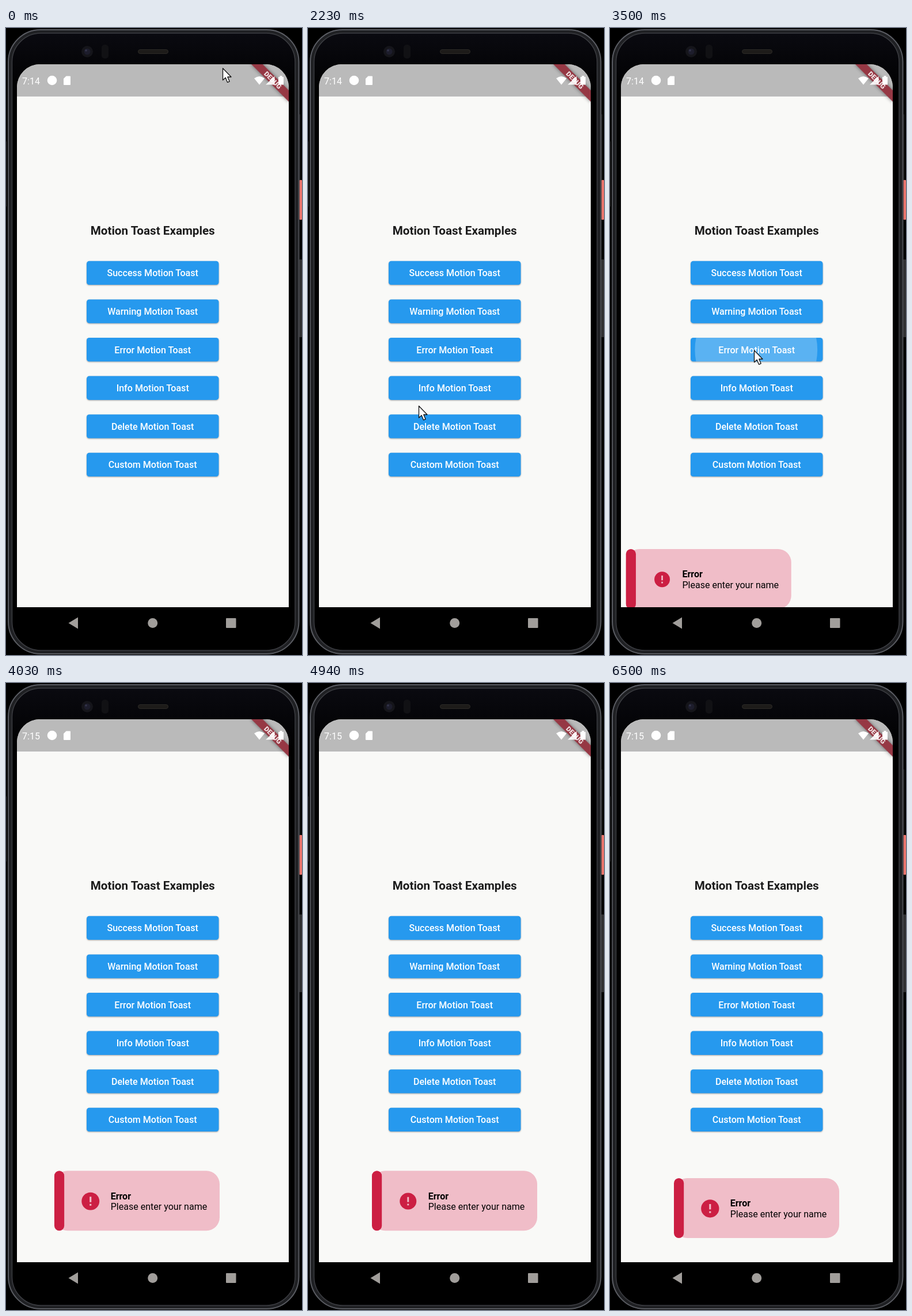
An HTML page for the animation above (6.53 s loop, 514 px wide and 1089 px high).

```html
<!DOCTYPE html>
<html lang="en">
<head>
<meta charset="utf-8">
<title>Motion Toast Examples</title>
<style>
  html, body { margin: 0; width: 100%; height: 100%; overflow: hidden; background: #000; }
  svg { display: block; width: 514px; height: 1089px; font: 16.06px Roboto, sans-serif; }
  .title { font-size: 20.65px; font-weight: 700; fill: #1c1c1c; }
  .label { font-weight: 500; fill: #fff; }
  .button { fill: #2699ee; filter: drop-shadow(0 1.6px 1.2px #0005); }
  .mid { text-anchor: middle; }
  .bold { font-weight: 700; }
</style>
</head>
<body>
<svg viewBox="0 0 514 1089">
  <defs>
    <clipPath id="screen"><path d="M19 1006V103a40 40 0 0 1 40-40H451a40 40 0 0 1 40 40V1006Z"/></clipPath>
    <clipPath id="errorButton"><rect x="140" y="538" width="229.500" height="41.300" rx="4.600"/></clipPath>
    <linearGradient id="edge" x2="0" y2="1">
      <stop offset="0" stop-color="#5c5e65"/>
      <stop offset=".4" stop-color="#484a4f"/>
      <stop offset="1" stop-color="#5a5c62"/>
    </linearGradient>
    <linearGradient id="glass" x2="0" y2="1">
      <stop offset="0" stop-color="#0a0a10"/>
      <stop offset=".1" stop-color="#000"/>
    </linearGradient>
  </defs>

  <!-- phone body -->
  <rect width="514" height="1089"/>
  <path d="M.5 197V310M510.500 150V264" stroke="#29292b"/>
  <rect x="509.500" y="264" width="4.500" height="69" rx="1" fill="#ea756d"/>
  <rect x="509" y="402" width="5" height="135" rx="1" fill="#303032"/>
  <rect x="4" y="3" width="504.500" height="1084" rx="56" fill="#1f2023" stroke="url(#edge)" stroke-width="2"/>
  <rect x="10.500" y="9" width="491.500" height="1072" rx="50" fill="url(#glass)" stroke="#3b3c41" stroke-width="1.500"/>
  <circle cx="141" cy="41" r="10" fill="#15151a"/>
  <circle cx="141" cy="41" r="5.500" fill="#1d1d2c"/>
  <circle cx="139" cy="39" r="1.800" fill="#35364c"/>
  <rect x="166" y="29" width="12" height="24" rx="5" fill="#111114"/>
  <rect x="229.500" y="37.500" width="52" height="7" rx="3.500" fill="#1d1b19" stroke="#2c2a27"/>

  <g clip-path="url(#screen)">
    <rect x="19" y="63" width="472" height="943" fill="#f9f9f7"/>
    <rect x="19" y="63" width="472" height="56" fill="#bababa"/>
    <text class="title mid" x="254.700" y="358.700">Motion Toast Examples</text>
    <g id="buttons"></g>
    <g clip-path="url(#errorButton)"><circle id="ripple" fill="#fff"/></g>
    <g id="errorLabel"></g>

    <g id="toast">
      <rect width="287" height="104" rx="23" fill="#f0bdc8"/>
      <rect width="17.200" height="104" rx="8.600" fill="#cc1f43"/>
      <g id="icon">
        <circle r="1" fill="#cc1f43"/>
        <path d="M-.1-.5H.1V.1H-.1ZM-.1.3H.1V.5H-.1Z" fill="#f0bdc8"/>
      </g>
      <text class="bold" x="97.700" y="49.300">Error</text>
      <text x="97.700" y="67.700">Please enter your name</text>
    </g>

    <!-- corner ribbon -->
    <g transform="translate(491 63) rotate(45)">
      <rect x="-46" y="32.100" width="92" height="13.800" fill="#963844" style="filter:drop-shadow(0 0 3px #0007)"/>
      <text class="mid" y="43.100" fill="#f3e6e7" style="font-size:11.700px;font-weight:900">DEBUG</text>
    </g>

    <!-- status icons -->
    <g fill="#fff">
      <text id="clock" x="28" y="97.500"></text>
      <circle cx="80" cy="91" r="8.300"/>
      <path d="M104.500 83.500H111a1 1 0 0 1 1 1V98a1 1 0 0 1-1 1H101a1 1 0 0 1-1-1V88Z"/>
      <path d="M431 87.500Q440 80.500 449 87.500L440 98.500Z"/>
      <path d="M451 98.500L466.500 83.500V98.500Z" opacity=".9"/>
      <path d="M473 85H475.500V83H479.500V85H482V98.500H473Z"/>
    </g>
  </g>

  <!-- navigation bar -->
  <g fill="#a19e9b">
    <path d="M108.500 1033.500L125 1023.500V1043.500Z"/>
    <circle cx="254.700" cy="1033.500" r="8.500"/>
    <rect x="382" y="1025" width="17.500" height="17" rx="1"/>
  </g>

  <path id="cursor" d="M0 0V20.500L4.700 16.200L8 24.300L11.600 22.800L8.300 15H14.500Z"
    fill="#fff" stroke="#111" stroke-width="1.300" stroke-linejoin="round"/>
</svg>
<script>
const LOOP = 6530, PRESS = 3248, TAP = 3428, CLOSE = TAP + 3000;
const $ = id => document.getElementById(id);
const clamp = v => Math.min(1, Math.max(0, v));
const mix = (a, b, v) => a + (b - a) * v;
const smooth = v => v * v * (3 - 2 * v);

function bezier(x1, y1, x2, y2) {
  const at = (a, b, s) => 3 * a * s * (1 - s) ** 2 + 3 * b * s * s * (1 - s) + s ** 3;
  return x => {
    if (x <= 0 || x >= 1) return clamp(x);
    let lo = 0, hi = 1;
    for (let i = 0; i < 24; i++) {
      const m = (lo + hi) / 2;
      if (at(x1, x2, m) < x) lo = m; else hi = m;
    }
    return at(y1, y2, lo);
  };
}
const ease = bezier(.25, .1, .25, 1);
const decelerate = bezier(0, 0, .2, 1);

['Success', 'Warning', 'Error', 'Info', 'Delete', 'Custom'].forEach((name, i) => {
  const y = 404.8 + 66.6 * i;
  const label = `<text class="label mid" x="254.700" y="${y + 26.6}">${name} Motion Toast</text>`;
  $('buttons').innerHTML +=
    `<rect class="button" x="140" y="${y}" width="229.500" height="41.300" rx="4.600"/>` +
    (name === 'Error' ? '' : label);
  if (name === 'Error') $('errorLabel').innerHTML = label;
});

// time, x, y of the pointer tip
const path = [
  [0, 376.5, 70], [1260, 372.5, 86], [2200, 192.5, 656.5], [2300, 192.5, 656.5],
  [3050, 250.5, 560], [3600, 250.5, 560], [3950, 530, 500], [LOOP, 530, 500]
];

function drawCursor(t) {
  const i = path.findIndex(p => p[0] > t);
  const [t0, x0, y0] = path[i - 1], [t1, x1, y1] = path[i];
  const v = smooth((t - t0) / (t1 - t0));
  $('cursor').setAttribute('transform', `translate(${mix(x0, x1, v)} ${mix(y0, y1, v)})`);
}

function drawRipple(t) {
  const held = clamp((Math.min(t, TAP) - PRESS) / 1000);
  const v = ease(clamp(held + Math.max(0, t - TAP) / 225));
  const fade = clamp((t - PRESS) / 75) * (1 - clamp((t - TAP - 225) / 150));
  const r = $('ripple');
  r.setAttribute('cx', mix(250, 254.7, v));
  r.setAttribute('cy', mix(560, 558.8, v));
  r.setAttribute('r', 123 * mix(.3, 1, v));
  r.setAttribute('opacity', .24 * fade);
}

function drawToast(t) {
  const age = t - TAP;
  const open = t < CLOSE ? age / 250 : 1 - (t - CLOSE) / 200;
  const x = 111 - 86 * (1 - ease(age / 1500));
  const y = 847.3 + 158 * (1 - decelerate(open));
  $('toast').setAttribute('visibility', age > 0 ? 'visible' : 'hidden');
  $('toast').setAttribute('transform', `translate(${x} ${y})`);
  const beat = Math.max(0, age) / 930 % 2;
  const size = 13.2 + 3.5 * (1 - Math.abs(1 - beat));
  $('icon').setAttribute('transform', `translate(62.800 52.800) scale(${size})`);
}

function draw() {
  const t = performance.now() % LOOP;
  drawCursor(t);
  drawRipple(t);
  drawToast(t);
  $('clock').textContent = t < 3770 ? '7:14' : '7:15';
  requestAnimationFrame(draw);
}
draw();
</script>
</body>
</html>
```
